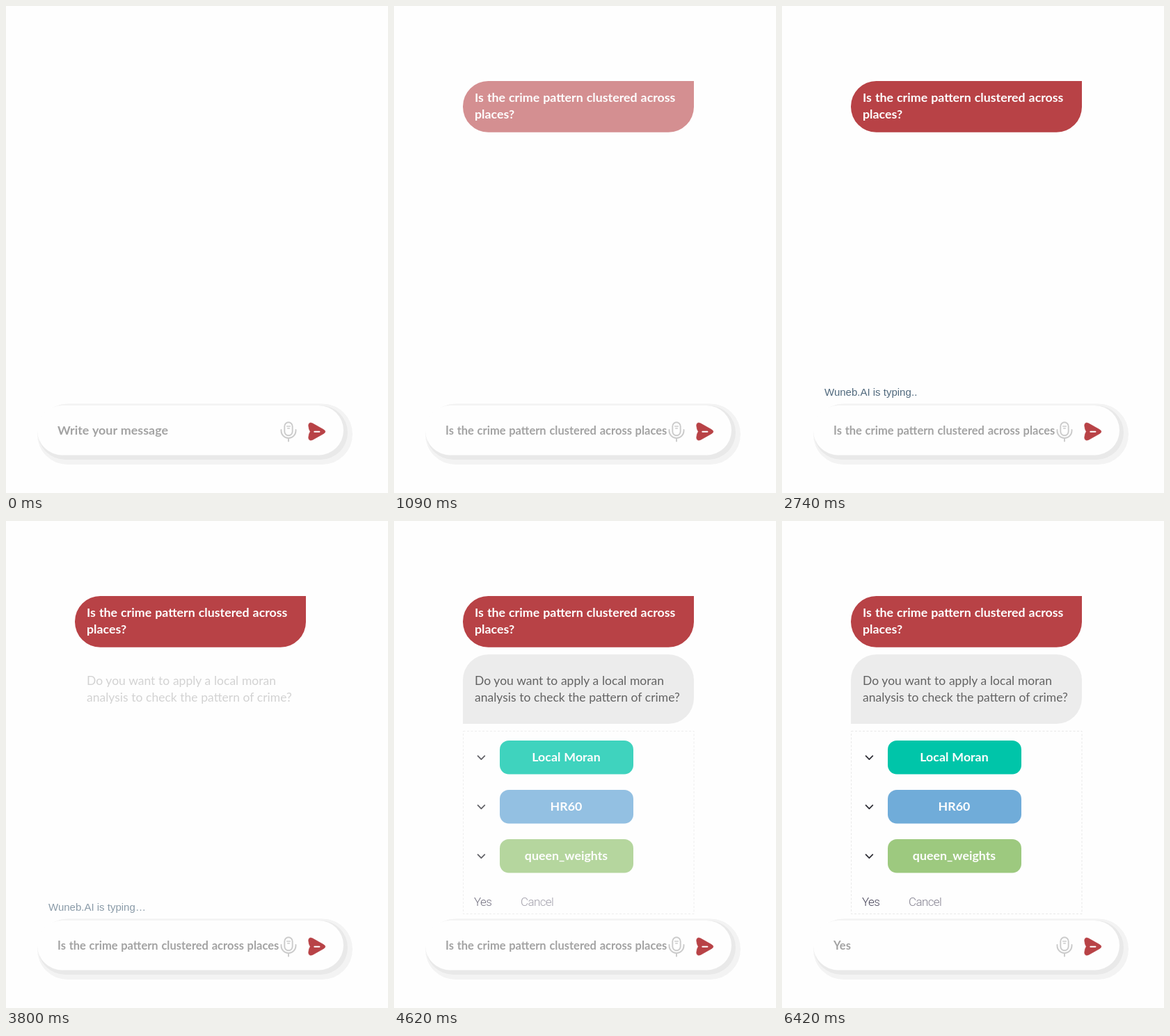
An HTML page for the animation above (8000 ms loop, 549 by 701 pixels).

```html
<!DOCTYPE html>
<html lang="en">
<head>
<meta charset="utf-8">
<title>Chat assistant</title>
<style>
  html, body { margin: 0; width: 100%; height: 100%; overflow: hidden; background: #fefefe; }
  svg { display: block; width: 549px; height: 701px; }

  text { font: 700 17.8px Lato, sans-serif; word-spacing: .7px; white-space: pre; }
  .bubble text { fill: #fefefe; }
  .answer text { font-weight: 400; font-size: 17.5px; word-spacing: .2px; fill: #636363; }
  .field text { font-size: 16.5px; fill: #a3a3a3; }
  .field .hint { font-size: 17.9px; }
  .status text { font: 400 15px "Liberation Sans", Arial, sans-serif; word-spacing: 0; fill: #50697d; }
  .choice text { fill: #fefefe; text-anchor: middle; }
  .options .action { font: 300 17px Roboto, sans-serif; letter-spacing: -.6px; }
  .line { fill: none; stroke-linecap: round; stroke-linejoin: round; }

  /* Every animation shares one 8 s clock and changes in hard steps. */
  .anim { animation: 8s step-end infinite; }
  .question { animation-name: question; }
  .status { animation-name: status; }
  .dots { animation-name: dots; }
  .dot2 { animation-name: dot2; }
  .ellipsis { animation-name: ellipsis; }
  .answer { animation-name: answer; }
  .answer-box { animation-name: answer-box; }
  .options { animation-name: options; }
  .hint { animation-name: hint; }
  .typed { animation-name: typed; }
  .confirm { animation-name: confirm; }

  @keyframes question {
    0% { opacity: 0 } 10.74% { opacity: .2 } 12.17% { opacity: .4 }
    13.61% { opacity: .59 } 15.05% { opacity: .8 } 16.49%, 100% { opacity: 1 }
  }
  @keyframes status {
    0% { opacity: 0 } 23.86% { opacity: .3 } 25.36% { opacity: .5 }
    26.86% { opacity: .75 } 28.36% { opacity: 1 }
    47.49% { opacity: .67 } 48.86% { opacity: .33 } 50.36%, 100% { opacity: 0 }
  }
  @keyframes dots {
    0% { opacity: 1 } 40.11% { opacity: .5 } 41.61%, 100% { opacity: 0 }
  }
  @keyframes dot2 {
    0% { opacity: 0 } 31.24% { opacity: .33 } 32.74% { opacity: .67 } 34.24%, 100% { opacity: 1 }
  }
  @keyframes ellipsis {
    0% { opacity: 0 } 40.11% { opacity: .5 } 41.61%, 100% { opacity: 1 }
  }
  @keyframes answer {
    0% { opacity: 0 } 47.49% { opacity: .28 } 48.86% { opacity: .65 } 50.36%, 100% { opacity: 1 }
  }
  @keyframes answer-box {
    0% { opacity: 0 } 48.86% { opacity: .6 } 50.36%, 100% { opacity: 1 }
  }
  @keyframes options {
    0% { opacity: 0 } 54.86% { opacity: .24 } 56.24% { opacity: .5 }
    57.74% { opacity: .75 } 59.24%, 100% { opacity: 1 }
  }
  @keyframes hint { 0% { opacity: 1 } 6.24%, 100% { opacity: 0 } }
  @keyframes typed { 0% { opacity: 0 } 6.24% { opacity: 1 } 80.24%, 100% { opacity: 0 } }
  @keyframes confirm { 0% { opacity: 0 } 80.24%, 100% { opacity: 1 } }
</style>
</head>
<body>
<svg viewBox="0 0 549 701">
  <defs>
    <rect id="pill" x="152" y="316" width="192" height="48.5" rx="13"/>
    <path id="chevron" class="line" d="M120.5 338.2l4.9 4.9 4.9-4.9" stroke="#2f2f36" stroke-width="1.8"/>
  </defs>

  <g class="anim question bubble">
    <path d="M135.500 108H431V145.200A36.500 36.500 0 0 1 394.500 181.700H135.500A36.500 36.500 0 0 1 99 145.200V144.500A36.500 36.500 0 0 1 135.500 108Z" fill="#b84246"/>
    <text x="116" y="138.200">Is the crime pattern clustered across</text>
    <text x="116" y="162.200">places?</text>
  </g>

  <path class="anim answer-box" d="M136 192H394A37 37 0 0 1 431 229V255A37 37 0 0 1 394 292H99V229A37 37 0 0 1 136 192Z" fill="#ececec"/>
  <g class="anim answer">
    <text x="116" y="235.700">Do you want to apply a local moran</text>
    <text x="116" y="259.700">analysis to check the pattern of crime?</text>
  </g>

  <g class="anim options">
    <rect x="99.500" y="302.500" width="331.500" height="263" fill="none" stroke="#e8e8e8" stroke-dasharray="3 2.500"/>
    <g class="choice">
      <use href="#chevron"/>
      <use href="#pill" fill="#00c5a9"/>
      <text x="247.500" y="346">Local Moran</text>
    </g>
    <g class="choice" transform="translate(0 71)">
      <use href="#chevron"/>
      <use href="#pill" fill="#70acd9"/>
      <text x="247.500" y="346">HR60</text>
    </g>
    <g class="choice" transform="translate(0 142)">
      <use href="#chevron"/>
      <use href="#pill" fill="#9dc97f"/>
      <text x="247.500" y="346">queen_weights</text>
    </g>
    <text class="action" x="115" y="554" fill="#454257">Yes</text>
    <text class="action" x="182" y="554" fill="#83808f">Cancel</text>
  </g>

  <g class="anim status">
    <text x="61" y="561.400">Wuneb.AI is typing</text>
    <g class="anim dots">
      <text x="186" y="561.400">.</text>
      <text class="anim dot2" x="190.200" y="561.400">.</text>
    </g>
    <text class="anim ellipsis" x="186" y="561.400">…</text>
  </g>

  <g class="field">
    <rect x="45" y="572.500" width="453" height="87.500" rx="43.500" fill="#f3f3f3"/>
    <rect x="46" y="575" width="445" height="78" rx="39" fill="#e9e9e9"/>
    <rect x="45" y="575" width="440" height="71.500" rx="35.750" fill="#fefefe"/>
    <text class="anim hint" x="74" y="617">Write your message</text>
    <text class="anim typed" x="74" y="617">Is the crime pattern clustered across places</text>
    <text class="anim confirm" x="74" y="617">Yes</text>

    <g class="line" stroke="#cbcbcb" stroke-width="1.900">
      <rect x="400.300" y="599.300" width="11.400" height="19" rx="5.700"/>
      <path d="M395.500 610v1.500a10.500 10.500 0 0 0 21 0V610M406 622.500v4"/>
      <path d="M403.700 605h4.600M404.700 608h2.600" stroke-width="1.500"/>
    </g>
    <path d="M441 601L456 609.500Q461.500 612.700 456 615.800L441 624.200Q435 627 434.800 621Q435 616 437.300 612.600Q435 609 434.800 604Q435 598 441 601Z" fill="#b84246" stroke="#b84246" stroke-width=".8"/>
    <path class="line" d="M443.300 612.700h7.200" stroke="#fefefe" stroke-width="1.900"/>
  </g>
</svg>
</body>
</html>
```
